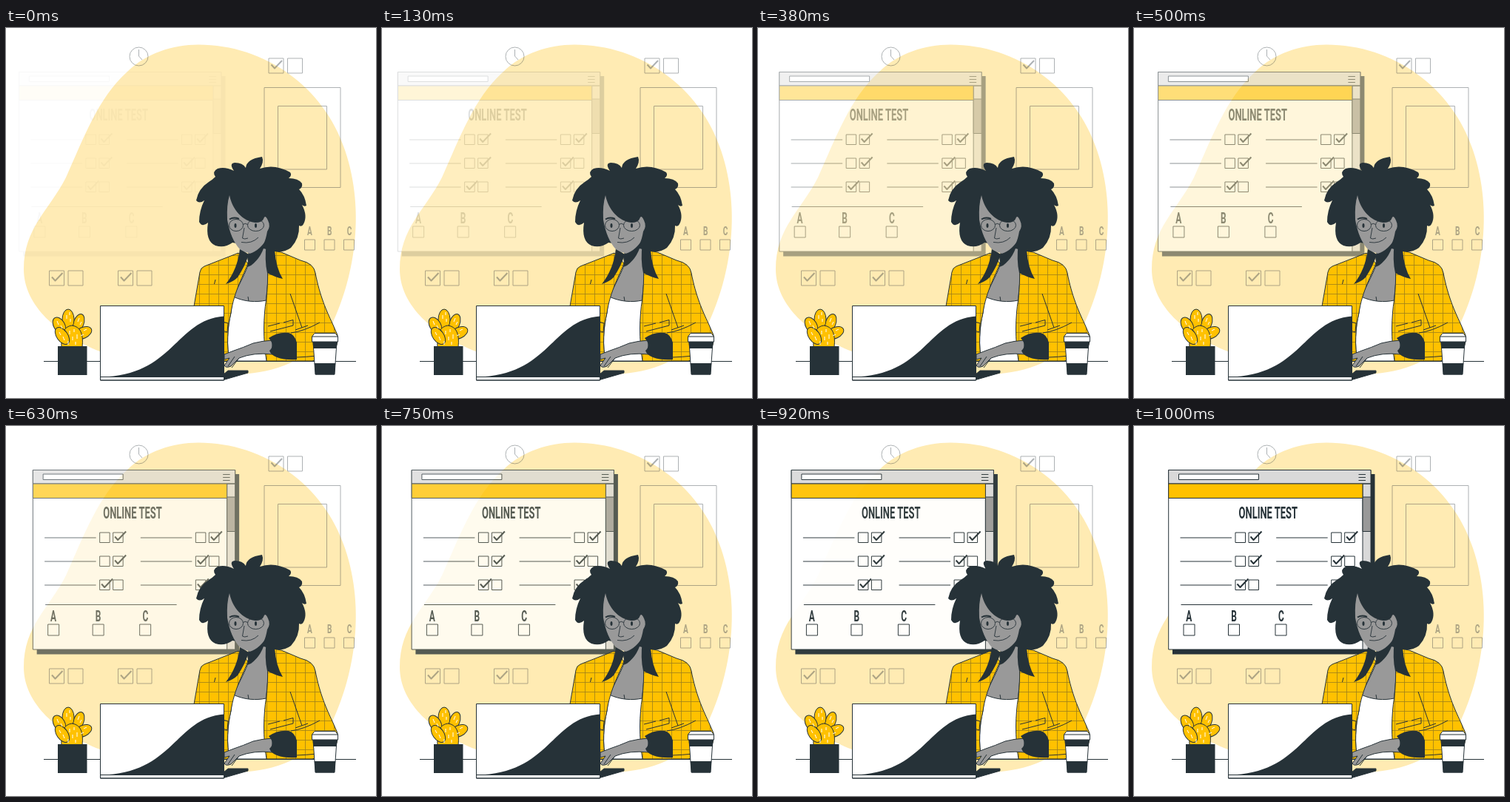
These frames come from a looping animation (500x500 px, 1.04 s). An HTML page:

```html
<!DOCTYPE html>
<html lang="en">
<head>
<meta charset="utf-8">
<title>Online test</title>
<style>
  html, body { margin: 0; width: 100%; height: 100%; overflow: hidden; background: #fff; }
  svg { display: block; width: 100%; height: 100%; }
  .line { fill: none; stroke: #263238; stroke-linejoin: round; }
  .dark { fill: #263238; }
  .skin { fill: #999; }
  .ink { stroke: #263238; stroke-linejoin: round; }
  .gold { fill: #ffc100; }
  .white { fill: #fff; }
  text { font: 700 22px Roboto, "Liberation Sans", sans-serif; fill: #263238; text-anchor: middle; }
</style>
</head>
<body>
<svg viewBox="0 0 500 500">
  <defs>
    <path id="box" d="M0 0h13.5v13.5h-13.5z"/>
    <path id="tick" d="M2.5 5.5L6.5 10L17.5 -1.5" stroke-width="2"/>
    <path id="bigBox" d="M0 0h20v20h-20z"/>
    <path id="bigTick" d="M3.5 8.5L8 13.5L18 3" stroke-width="2"/>
    <pattern id="plaid" width="13" height="13" x="365" y="333" patternUnits="userSpaceOnUse">
      <path d="M.5 0V13M0 .5H13" stroke="#263238" stroke-width=".8" opacity=".45"/>
    </pattern>
    <g id="coat">
      <path d="M314 304L268 322Q263 324 262 330L254 376V450H302C298 430 299 405 304 385C308 356 322 332 327 318Z"/>
      <path d="M355 300L372 303L398 314Q416 318 418 331C424 362 433 382 441 399L448 415Q450 432 438 441L414 450H352C347 420 348 390 351.5 368C354 350 354 328 353 310Z"/>
    </g>
  </defs>

  <path fill="#ffebb3" d="M260 22.5C350 22.5 430 80 458 165C487 250 470 342 437 408C402 457 352 467 310 468C240 468 180 460 127 437C70 415 24 375 24 326C24 270 58 247 81 202C105 149 124 95 164 59C190 34 225 22.5 260 22.5Z"/>

  <g id="back" opacity=".38">
    <g class="line" id="props">
      <circle cx="179.5" cy="38.5" r="12.5"/>
      <path d="M179.5 29V38L184 43M349 80.5H452V215.5H349ZM367.5 105.5H433.5V191H367.5Z"/>
      <path d="M403.5 286h14v14h-14zM430 286h14v14h-14zM456.5 286h14v14h-14z"/>
    </g>
  </g>

  <g id="window">
    <path class="dark" d="M52 65H325.5V308.5H52Z"/>
    <path class="white ink" d="M46.7 59.5H320V302H46.7Z"/>
    <path class="ink" fill="#d9d9d9" d="M46.7 59.5H320V78H46.7ZM309 78H320V302H309Z"/>
    <path class="ink" fill="#999" d="M309 96H320V142.5H309Z"/>
    <path class="gold ink" d="M46.7 78H309V97.5H46.7Z"/>
    <path class="white ink" d="M60.5 65H168.5V72.5H60.5Z"/>
    <g class="line" id="form">
      <path d="M303.5 65.5h9.5m-9.5 4h9.5m-9.5 4h9.5M63.5 241.5H241"/>
      <path d="M67 268h15v15h-15zM127.5 268h15v15h-15zM191 268h15v15h-15z"/>
    </g>
  </g>

  <path class="line" d="M51 450.5H473"/>

  <g id="woman">
    <path class="white ink" d="M307 358L353 362V450H302C298 430 299 405 304 385Z"/>
    <path class="skin ink" d="M328 300L352 290L354 340L351.5 368C338 371 322 370 307 363C316 345 324 330 328 318Z"/>
    <path class="line" d="M327 363L328 369"/>
    <use href="#coat" class="gold ink"/>
    <use href="#coat" fill="url(#plaid)"/>
    <path class="line" d="M283 340L281.5 346M384 359L400 405M283 394L300 399L299 411L286 407M354 403L370 399M375 398L388 394.5V402L357 410M385 412Q402 410 424 398M391 408L408 402M392 445Q420 444 440 440"/>

    <path class="dark" d="M316 298Q313 326 297 346Q307 343 313 337Q323 322 328 306ZM352 290Q349 314 353 331Q362 336 374 339Q365 325 363 300Z"/>
    <path class="dark" d="M306 290Q295 298 283 294Q269 288 273 263Q265 270 261 262Q261 247 268 233Q261 238 257 233Q260 217 274 208Q279 205 283 201Q278 194 286 190Q296 187 308 193Q301 183 309 182Q320 182 324 189Q325 177 346 174Q349 181 343 190Q363 183 384 195Q387 199 382 203Q395 203 400 210Q401 216 396 218Q404 226 406 240Q403 242 400 239Q408 254 402 265Q400 269 396 267Q397 284 385 297Q374 305 360 301L340 296Z"/>
    <path class="skin" d="M302 226C306 246 320 261 337 263Q346 263 348 258Q350 251 354 260Q358 268 353 275C351 287 347 298 340 303Q328 307 316 299C308 290 302 277 299 259Q298 239 302 226Z"/>
    <path class="dark" d="M325 306Q341 303 351 287Q347 309 331 321L326 323Q328 315 325 306Z"/>
    <g class="line" stroke-width=".9">
      <ellipse cx="311" cy="266.5" rx="9.5" ry="8"/>
      <ellipse cx="337.5" cy="266.5" rx="11" ry="8"/>
      <path d="M320.5 265.5Q323 263 326.5 265.5M322 270L319.5 284Q322 286 327 284M318 289.5Q332 292 341 283"/>
      <path d="M302 258.5Q308 255 315 258" stroke-width="2"/>
    </g>
    <ellipse class="dark" cx="310" cy="267" rx="1.5" ry="3"/>
    <ellipse class="dark" cx="337.5" cy="267" rx="1.5" ry="3"/>

    <path class="skin ink" d="M360 422Q345 423 334 426Q320 432 308 436L295 441V448L302 446L295 456Q297 460 304 457L315 446Q335 438 360 441Z"/>
    <path class="line" d="M309 444L300 457M315 446L305 459"/>
    <path class="dark" d="M355 419Q368 410 382 412Q390 414 393 425V448Q377 449 366 445Q358 442 356 436Q364 429 355 419Z"/>
  </g>

  <g id="plant">
    <g class="gold ink">
      <ellipse cx="98" cy="399" rx="7" ry="13" transform="rotate(20 98 399)"/>
      <ellipse cx="84" cy="394" rx="8" ry="14"/>
      <ellipse cx="72" cy="402" rx="7.5" ry="12" transform="rotate(-30 72 402)"/>
      <ellipse cx="104" cy="412" rx="12.5" ry="7.5" transform="rotate(-25 104 412)"/>
      <path d="M75 431Q73 404 89 402Q106 404 103 431Z"/>
      <ellipse cx="76" cy="416" rx="7.5" ry="13" transform="rotate(-35 76 416)"/>
    </g>
    <path fill="none" stroke="#fff" d="M82 388v5M86 384v4M87 393v4M69 396l2 5M74 402l2 4M99 392l-2 5M102 397l-2 4M109 407l-4 2M105 414l-4 2M72 411l2 4M77 417l2 5M86 409v5M92 407v4M90 417v5M96 414v6M84 423v5M94 424v4"/>
    <path class="dark" d="M70 430H109.5V469H70Z"/>
  </g>

  <g id="laptop">
    <path class="dark ink" d="M294 468L300 463H327V466L294 475.5Z"/>
    <path class="white ink" d="M127.5 375.5H294.5V476H127.5Z"/>
    <path class="dark" d="M128 471.5C227 470 228 395 294.5 389.5V471.5Z"/>
    <path class="line" d="M127.5 471.5H294.5V476H127.5Z"/>
  </g>

  <g id="cup">
    <path class="white ink" d="M415 424H447L444 468H418Z"/>
    <path class="dark" d="M414.5 424H447.5L446.7 433H415.3ZM416.8 453H445.2L444 468.5H418Z"/>
    <path class="white ink" d="M417 412.5H445L448.5 417V424H413.5V417ZM413.5 417H448.5"/>
  </g>
</svg>
<script>
  const byId = id => document.getElementById(id);
  const add = (id, html) => byId(id).insertAdjacentHTML("beforeend", html);

  // One narrow lettering style at different sizes
  const label = (text, x, y, size) =>
    `<text transform="translate(${x} ${y}) scale(${0.59 * size} ${size})">${text}</text>`;
  const letters = (xs, y, size) => xs.map((x, i) => label("ABC"[i], x, y, size)).join("");
  const use = (id, x, y) => `<use href="#${id}" x="${x}" y="${y}"/>`;

  // Ticked column for each row, left and right half
  [[1, 1], [1, 0], [0, 0]].forEach((row, r) => row.forEach((ticked, half) => {
    const x = 62.5 + 129.7 * half, y = 144 + 32 * r;
    add("form", `<path d="M${x} ${y + 7}h69.5"/>` +
      use("box", x + 74.5, y) + use("box", x + 92.5, y) +
      use("tick", x + 74.5 + 18 * ticked, y));
  }));
  add("window", label("ONLINE TEST", 181.3, 124.5, 1) + letters([74.3, 135, 198.8], 264, 0.92));

  for (const [x, y] of [[355, 41], [58.5, 328], [151.5, 328]])
    add("props", use("bigBox", x, y) + use("bigTick", x, y) + use("bigBox", x + 25.5, y));
  add("back", letters([410.5, 437.3, 464], 279.5, 0.78));

  const LOOP = 1040, STEP = 1000 / 24;
  const pane = byId("window");
  const start = performance.now();

  function draw() {
    const t = (performance.now() - start) % LOOP;
    // 24 steps a second, each shown from the nearest 10 ms
    const step = Math.floor((Math.floor(t / 10) * 10 + 4.99) / STEP);
    const p = Math.min(1, step / 24 + 0.03);
    pane.setAttribute("opacity", p);
    pane.setAttribute("transform", `translate(${30 * (p - 1)} 0)`);
    requestAnimationFrame(draw);
  }
  draw();
</script>
</body>
</html>
```
